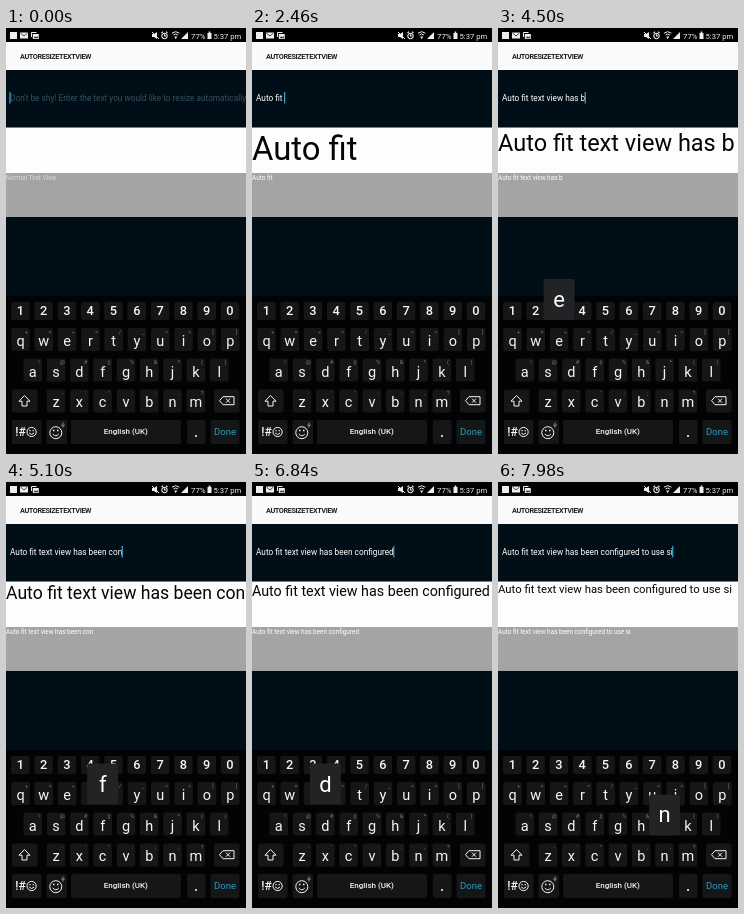
An HTML page with a canvas for the animation above (8000 ms loop, 240x426 px).

```html
<!DOCTYPE html>
<html lang="en">
<head>
<meta charset="utf-8">
<title>Auto resize text view</title>
<style>
html, body { margin: 0; width: 100%; height: 100%; overflow: hidden; background: #000; }
canvas { display: block; width: 240px; height: 426px; }
</style>
</head>
<body>
<canvas id="stage"></canvas>
<script>
const W = 240, H = 426, LOOP = 8000, TICK = 60;
const canvas = document.getElementById('stage');
const ctx = canvas.getContext('2d');
const dpr = window.devicePixelRatio || 1;
canvas.width = W * dpr;
canvas.height = H * dpr;

const message = 'Auto fit text view has been configured to use sin';
// Moment each character is typed, in ticks
const typed = [
  7, 10, 13, 16, 22, 25, 28, 31, 36, 47, 49, 51, 53, 54, 61, 62, 64, 66, 67,
  69, 70, 71, 72, 74, 76, 77, 79, 80, 82, 83, 84, 86, 89, 92, 95, 98, 102, 113,
  116, 118, 119, 122, 124, 125, 127, 128, 130, 132, 134
].map(n => n * TICK - 10);

const PITCH = 23.3;
const rows = [
  { keys: '1234567890', marks: '', x: 14.3, y: 283, h: 18, base: 287.2, size: 12.8, weight: 500 },
  { keys: 'qwertyuiop', marks: '+×÷=/_<>[]', x: 14.5, y: 311.5, h: 23, base: 317.8, size: 14.5 },
  { keys: 'asdfghjkl', marks: '!@#$%&*()', x: 26.8, y: 342, h: 23, base: 348.6, size: 14.5 },
  { keys: 'zxcvbnm', marks: '-\'":;,?', x: 50, y: 373, h: 23, base: 378.8, size: 14.5 }
];

function font(size, weight = 400) {
  ctx.font = `${weight} ${size}px Roboto, "Noto Sans", sans-serif`;
}

function text(str, x, y, size, color, align = 'left', weight = 400) {
  font(size, weight);
  ctx.fillStyle = color;
  ctx.textAlign = align;
  ctx.fillText(str, x, y);
}

function rect(x, y, w, h, color) {
  ctx.fillStyle = color;
  ctx.fillRect(x, y, w, h);
}

function box(x, y, w, h, color, r = 2) {
  ctx.fillStyle = color;
  ctx.beginPath();
  ctx.roundRect(x, y, w, h, r);
  ctx.fill();
}

function path(d, color, width) {
  const p = new Path2D(d);
  if (width) {
    ctx.strokeStyle = color;
    ctx.lineWidth = width;
    ctx.stroke(p);
  } else {
    ctx.fillStyle = color;
    ctx.fill(p);
  }
}

function statusBar() {
  const c = '#eee';
  rect(0, 0, W, 14, '#000');
  rect(4, 4, 7, 7, c);
  rect(14, 4.5, 8, 6, c);
  path('M14.5 5l3.5 3 3.5-3', '#333', .9);
  path('M25.5 9V4.5h5', c, 1);
  rect(26.8, 6, 6, 5, c);
  path('M27.5 10.3l1.6-2 1.2 1 1-1.2 1 2.2z', '#333');
  path('M146 6h2l3-2v7l-3-2h-2z', c);
  path('M146 4l7 7', c, 1);
  path('M155.8 8a2.7 2.7 0 1 0 5.4 0a2.7 2.7 0 1 0-5.4 0M158.5 6.2V8h1.5M155.5 5l1.5-1.4M161.5 5L160 3.6', c, 1.1);
  path('M166 5.2q3.7-3 7.4 0M167.5 7q2.2-2 4.4 0', c, 1);
  path('M168.2 8.5h3l-1.5 2.7z', c);
  path('M175 11h7V4z', c);
  text('77%', 185, 10.6, 7.8, c);
  path('M201.5 5h1.2V3.6h1.6V5h1.2v6h-4z', c);
  text('5:37 pm', 235.3, 10.6, 7.7, c, 'right');
}

function views(str) {
  rect(0, 14, W, 28, '#fafafa');
  ctx.letterSpacing = '-0.4px';
  text('AUTORESIZETEXTVIEW', 14, 30.8, 7.3, '#222', 'left', 700);
  ctx.letterSpacing = '0px';

  text(str || "Don't be shy! Enter the text you would like to resize automatically!",
    4, 72.7, 8.27, str ? '#fff' : '#34505c');
  rect(3.4 + ctx.measureText(str).width, 64, 1.2, 11.5, '#43a9d0');

  rect(0, 99, W, 1, '#3f8fc4');
  rect(0, 100, W, 45, '#fdfdfd');
  rect(0, 145, W, 44, '#a4a4a4');
  if (str) {
    // Largest size step that still fits on one line
    font(100);
    const fit = W * 100 / ctx.measureText(str.trimEnd()).width;
    const size = Math.min(32.8, Math.floor(fit / .42) * .42);
    text(str, 0, 100.8 + .94 * size, size, '#050505');
  }
  text(str || 'Normal Text View', 0, 152, 6.43, str ? '#fff' : '#dadada');
}

function keyboard(caps) {
  const key = '#151618', ink = '#f6f6f6';
  rect(0, 268, W, H - 268, '#020304');
  for (const row of rows) {
    [...row.keys].forEach((ch, i) => {
      const x = row.x + i * PITCH;
      box(x - 9.3, row.y - row.h / 2, 18.6, row.h, key);
      text(caps ? ch.toUpperCase() : ch, x, row.base, row.size, ink, 'center', row.weight);
      if (row.marks) text(row.marks[i], x + 6.2, row.y - 6, 5.8, '#777', 'center');
    });
  }
  box(6, 361.5, 25.5, 23, key);
  path('M18.5 367.5l-5.5 5.7h3v4.8h5v-4.8h3z', caps ? '#2da5d0' : ink, 1);
  box(208, 361.5, 25.5, 23, key);
  path('M213.5 372.7l3.5-4h11v8h-11zM220 370.7l4 4M224 370.7l-4 4', ink, 1);

  box(6, 392, 29.5, 24, key);
  text('!#', 9.3, 408, 12, ink, 'left', 500);
  path('M21 404a4.6 4.6 0 1 0 9.2 0a4.6 4.6 0 1 0-9.2 0M23.2 405q2.4 3 4.8 0', ink, 1);
  path('M23.4 402h1.2v1.2h-1.2zM26.6 402h1.2v1.2h-1.2z', ink);
  box(40.5, 392, 20.5, 24, key);
  path('M43.8 404.7a6 6 0 1 0 12 0a6 6 0 1 0-12 0M46.8 406q3 3.6 6 0', ink, 1);
  path('M47 401.8h1.5v1.5H47zM51 401.8h1.5v1.5H51z', ink);
  path('M57 394.5v2.5M55.2 396.8q1.8 2.4 3.6 0M57 398v1.5', '#999', .9);
  box(65, 392, 110, 24, key);
  text('English (UK)', 119.8, 406.2, 8, ink, 'center', 500);
  box(181, 392, 18.5, 24, key);
  text('.', 190, 408.7, 15, ink, 'center', 500);
  box(204.5, 392, 29, 24, key);
  text('Done', 219, 407.2, 9.5, '#2b9cc4', 'center');
}

function popup(ch) {
  const row = rows.find(r => r.keys.includes(ch.toLowerCase()));
  if (!row) return;
  const x = row.x + row.keys.indexOf(ch.toLowerCase()) * PITCH;
  box(x - 15.5, row.y - 60.5, 31, 41, '#212325', 2.5);
  text(ch, x, row.base - 38.8, 22, '#fff', 'center');
}

function draw(t) {
  ctx.setTransform(dpr, 0, 0, dpr, 0, 0);
  rect(0, 0, W, H, '#000f17');
  const count = typed.filter(time => time <= t).length;
  statusBar();
  views(message.slice(0, count));
  keyboard(t >= TICK && count === 0);
  const pressed = typed.findLastIndex(time => time - 80 <= t);
  if (pressed >= 0 && t < typed[pressed] + 90) popup(message[pressed]);
}

const start = performance.now();
function frame() {
  draw((performance.now() - start) % LOOP);
  requestAnimationFrame(frame);
}
frame();
</script>
</body>
</html>
```
